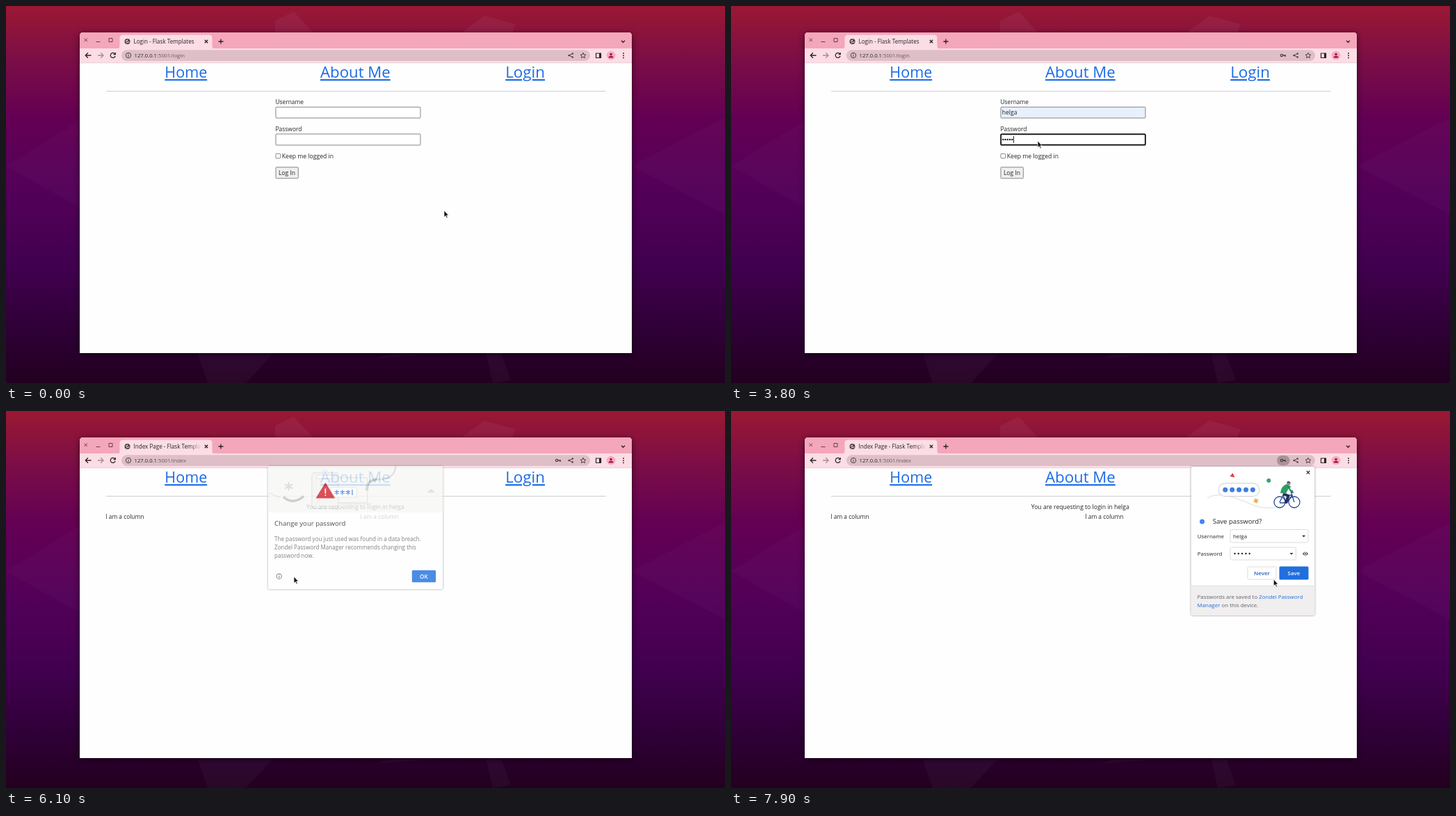
Write an HTML page that moves like this. It is 1034 by 542 pixels and loops after 8000 ms.

```html
<!DOCTYPE html>
<html lang="en">
<head>
<meta charset="utf-8">
<title>Login flow</title>
<style>
html, body { margin: 0; width: 100%; height: 100%; overflow: hidden; background: #4b0050; }
svg { display: block; width: 1034px; height: 542px; font-family: "Open Sans", "Noto Sans", sans-serif; }
text { white-space: pre; fill: #212529; }
.nav text { fill: #1a6be6; font-weight: 500; text-decoration: underline; text-decoration-thickness: 1.7px; text-underline-offset: 2.2px; }
.line { fill: none; stroke: #2b2226; stroke-width: 1.3; }
.field { fill: #fff; stroke: #85858a; stroke-width: 1; }
.focus { fill: none; stroke: #101010; stroke-width: 1.7; }
.card { filter: drop-shadow(0 .6px 1.3px #0008); }
.soft text { fill: #5f6368; }
.soft .link { fill: #1f6fd6; }
.bold { font-weight: 600; }
</style>
</head>
<body>
<svg viewBox="0 0 1034 542">
  <defs>
    <linearGradient id="sky" x2="0" y2="1">
      <stop offset="0" stop-color="#9a1833"/>
      <stop offset=".14" stop-color="#7c0e46"/>
      <stop offset=".3" stop-color="#630054"/>
      <stop offset=".48" stop-color="#540059"/>
      <stop offset=".68" stop-color="#420050"/>
      <stop offset=".87" stop-color="#2e0035"/>
      <stop offset="1" stop-color="#22001f"/>
    </linearGradient>
    <linearGradient id="fade">
      <stop offset="0" stop-color="#fcdde5" stop-opacity="0"/>
      <stop offset="1" stop-color="#fcdde5"/>
    </linearGradient>
    <g id="key">
      <circle r="1.7" cx="-2" fill="none" stroke="#4b4046" stroke-width="1.2"/>
      <path d="M0 0H4M3 0V2" fill="none" stroke="#4b4046" stroke-width="1.4"/>
    </g>
    <path id="drop" d="M-2.5-1.2H2.5L0 1.4Z" fill="#333"/>
  </defs>

  <rect width="1034" height="542" fill="url(#sky)"/>
  <g fill="#fff" fill-opacity=".045">
    <path d="M387 21L414 8 441 38H387ZM414 8V38H387ZM655 38L688 14 733 26 728 38Z"/>
    <path d="M275 499H385L345 542H290ZM530 507L560 499H640ZM690 499H712L726 538 700 542Z" fill-opacity=".03"/>
    <path d="M0 230L106 165V290ZM900 230L1034 160V300Z" fill-opacity=".018"/>
  </g>

  <!-- browser window -->
  <path d="M106 499V43Q106 38 111 38H895Q900 38 900 43V499Z" fill="#fefefe" style="filter:drop-shadow(0 2px 4px #0009)"/>
  <path d="M106 62V43Q106 38 111 38H895Q900 38 900 43V62Z" fill="#f4a6bb"/>
  <path d="M159 62Q163.500 62 163.500 57V46Q163.500 41.500 168 41.500H292Q296.500 41.500 296.500 46V57Q296.500 62 301 62Z" fill="#fcdde5"/>
  <rect x="106" y="61" width="794" height="21" fill="#fcdde5"/>
  <rect x="106" y="81.500" width="794" height=".7" fill="#dfc9cf"/>
  <rect x="166" y="63.300" width="674" height="15.700" rx="7.850" fill="#dfbfc7"/>
  <g class="line">
    <path d="M112.500 46.500L117 51M117 46.500L112.500 51M129.500 51.500H135.500M148 46.500H153V51.500H148Z" stroke="#6b3f4d" stroke-width="1"/>
    <path d="M285.800 48.800L290.200 53.200M290.200 48.800L285.800 53.200M305.500 51H312.500M309 47.500V54.500M885 49.800L887.500 52.300 890 49.800"/>
    <path d="M122.500 71H114.500M118 67.300L114.300 71 118 74.700"/>
    <path d="M132 71H140M136.300 67.300L140 71 136.300 74.700" stroke="#a58b93"/>
    <g stroke="#4b4046" stroke-width="1">
      <circle cx="176" cy="71" r="3.700"/>
      <path d="M176 70.300V73.200M176 68.600V69.500M814.800 68.500L809.600 71 814.800 73.500"/>
      <path d="M830 67.200L831.100 69.800 833.900 70.100 831.800 71.900 832.400 74.700 830 73.200 827.600 74.700 828.200 71.900 826.100 70.100 828.900 69.800Z"/>
    </g>
    <path d="M848.500 68H855.500V74.500H848.500ZM854 68V74.500" stroke-width="1.200"/>
    <path d="M853 68H855.500V74.500H853Z" fill="#2b2226" stroke="none"/>
  </g>
  <g fill="#4b4046"><circle cx="814.800" cy="68.500" r="1.200"/><circle cx="809.600" cy="71" r="1.200"/><circle cx="814.800" cy="73.500" r="1.200"/></g>
  <g fill="#2b2226"><circle cx="888" cy="68" r=".95"/><circle cx="888" cy="71.200" r=".95"/><circle cx="888" cy="74.400" r=".95"/></g>
  <circle cx="870" cy="71" r="6.300" fill="#f5aec1"/>
  <path d="M866.500 74.500Q866.500 71.800 870 71.800T873.500 74.500ZM868.200 69.500A1.800 1.800 0 1 1 871.800 69.500 1.800 1.800 0 1 1 868.200 69.500Z" fill="#a3123f"/>
  <g id="globe"><circle cx="174.500" cy="51" r="4" fill="#4b4046"/><path d="M171.800 50Q174 51 175 48.500M173 53.500Q174 51.500 177.500 52" fill="none" stroke="#fcdde5" stroke-width="1.200"/></g>
  <path id="spinner" d="M174.500 47.300A3.700 3.700 0 1 1 170.800 51" class="line" style="stroke:#6b5a60"/>
  <path id="reload" class="line" d="M156.600 68.900A3.500 3.500 0 1 0 157.100 72M157.300 67V69.700H154.600"/>
  <path id="stop" class="line" d="M150.800 68L156.800 74M156.800 68L150.800 74"/>
  <text id="title" x="183.500" y="53.900" font-size="8.100"></text>
  <g id="titleFade"><rect x="264" y="45" width="17" height="13" fill="url(#fade)"/><rect x="280.500" y="45" width="4" height="13" fill="#fcdde5"/></g>
  <text x="184.500" y="73.900" font-size="7.700">127.0.0.1<tspan id="path" fill="#6b5a60"></tspan></text>
  <g id="keyIcon"><rect id="keyPill" x="785" y="64" width="18.500" height="14.300" rx="7.150" fill="#aa9198"/><use href="#key" x="794" y="71"/></g>

  <!-- page -->
  <g class="nav">
    <text x="228.300" y="103.200" font-size="21.500">Home</text>
    <text x="452" y="103.200" font-size="22.200">About Me</text>
    <text x="718.200" y="103.200" font-size="22.400">Login</text>
  </g>
  <rect x="144" y="122" width="718.500" height="1" fill="#cfcfd1"/>
  <g id="login">
    <text x="387.500" y="141.400" font-size="8.400">Username</text>
    <text x="387.500" y="180.100" font-size="8.450">Password</text>
    <rect class="field" x="388" y="145.300" width="208" height="15.700" rx="1" id="nameBox"/>
    <rect class="field" x="388" y="184" width="208" height="16" rx="1"/>
    <rect id="nameFocus" class="focus" x="388.200" y="145.700" width="207.600" height="15" rx="1"/>
    <rect id="passFocus" class="focus" x="388.200" y="184.300" width="207.600" height="15.400" rx="1"/>
    <text id="name" x="389.700" y="156.200" font-size="8.600">helga</text>
    <path id="squiggle" d="M390 158.200q1-1.300 2 0t2 0 2 0 2 0 2 0 2 0 2 0 2 0 2 0 2 0 2 0" fill="none" stroke="#e0605e" stroke-width=".7"/>
    <g id="dots" fill="#212529"></g>
    <rect id="caret" width=".9" height="10" fill="#111"/>
    <rect x="388" y="212.300" width="6.600" height="6.600" rx="1" fill="#fff" stroke="#767676" stroke-width=".9"/>
    <text x="396.800" y="219" font-size="8.650">Keep me logged in</text>
    <rect x="388" y="231.800" width="32.300" height="16" rx="1" fill="#efefef" stroke="#858585"/>
    <rect id="buttonFocus" class="focus" x="388" y="231.800" width="32.300" height="16" rx="1"/>
    <text x="391.900" y="243.100" font-size="8.550">Log In</text>
    <g id="popup">
      <rect class="card" x="388.500" y="162" width="208" height="29" rx="1" fill="#fff"/>
      <rect id="row" x="388.500" y="165" width="208" height="23" fill="#e6e6e7"/>
      <text x="394" y="179.500" font-size="8.400">helga</text>
    </g>
  </g>
  <g id="index">
    <text x="431.800" y="141.400" font-size="8.600">You are requesting to login in helga</text>
    <text x="143.300" y="154.600" font-size="8.350">I am a column</text>
    <text x="509.300" y="154.600" font-size="8.350">I am a column</text>
  </g>

  <!-- breach warning -->
  <g id="warning">
    <rect class="card" x="378" y="80" width="249" height="175.500" rx="2" fill="#fff"/>
    <rect x="378" y="80" width="249" height="66" fill="#f7f8f5"/>
    <g fill="none" stroke="#dcdddd">
      <path d="M378 118Q386 121 396 125" stroke-width="1"/>
      <path d="M400 124Q413 136 429 123" stroke="#c3c4c4" stroke-width="3.500"/>
      <path d="M519 115Q518 100 534 99" stroke="#c3c4c4" stroke-width="3.500"/>
      <path d="M534 99Q558 100 560 80" stroke-width="2.500"/>
      <path d="M478 96.500H517Q519.500 96.500 519.500 99V132H478M470 134H526"/>
      <rect x="440.500" y="89.500" width="38" height="51" rx="4" fill="#f3f4f2"/>
      <path d="M447 98V93H472V98ZM456 93V89A3.500 3.500 0 0 1 463 89V93" fill="#fafafa"/>
      <path d="M407.500 103V115M402 106L413 112M413 106L402 112" stroke="#d5d6d6" stroke-width="2"/>
    </g>
    <path d="M605 118Q605 115 608 115 610 110 613 115 615 115 615 118Z" fill="#dcdddd"/>
    <rect x="468" y="110.500" width="36.500" height="14" fill="#fff" stroke="#d5dbe4" stroke-width=".8"/>
    <path d="M476 114V121M473 115.800L479 119.200M479 115.800L473 119.200M484 114V121M481 115.800L487 119.200M487 115.800L481 119.200M492 114V121M489 115.800L495 119.200M495 115.800L489 119.200M498 113.500V121.500" fill="none" stroke="#286fd6" stroke-width="1.200"/>
    <path d="M459.800 104.500L472.700 125.500H446.900Z" fill="#d2252f" stroke="#d2252f" stroke-linejoin="round"/>
    <path d="M459.800 112V119.200M459.800 121V122.700" stroke="#fff" stroke-width="1.700"/>
    <text x="387.200" y="165.200" font-size="9.500">Change your password</text>
    <g class="soft" font-size="8">
      <text x="387.200" y="186.500">The password you just used was found in a data breach.</text>
      <text x="387.200" y="198.700">Zondel Password Manager recommends changing this</text>
      <text x="387.200" y="210.900">password now.</text>
    </g>
    <g fill="none" stroke="#5f6368"><circle cx="393.800" cy="237" r="3.600"/><path d="M393.800 236.300V239.200M393.800 234.600V235.500"/></g>
    <rect id="ring" x="581.700" y="227.300" width="36.600" height="19.400" rx="2.500" fill="#fff" stroke="#1a5fc8" stroke-width="1.300"/>
    <rect x="583" y="228.500" width="34" height="17" rx="1.500" fill="#1f70e0"/>
    <text class="bold" x="600" y="240" font-size="8.200" text-anchor="middle" style="fill:#fff">OK</text>
  </g>

  <!-- save bubble -->
  <g id="save">
    <rect class="card" x="661.500" y="80" width="178" height="214" rx="2" fill="#fff"/>
    <path d="M661.500 251.500H839.500V292Q839.500 294 837.500 294H663.500Q661.500 294 661.500 292Z" fill="#f0eeef"/>
    <rect x="661.500" y="251" width="178" height=".8" fill="#dcdadb"/>
    <path d="M827.700 86L832.300 90.600M832.300 86L827.700 90.600" class="line" style="stroke-width:1.1"/>
    <path d="M685 125Q700 117 719 123T752 136Q764 140 782 139" fill="none" stroke="#dadce0"/>
    <rect x="701" y="103.800" width="59" height="18.800" rx="9.400" fill="#fff" stroke="#d3d6db" stroke-width="1.200"/>
    <g id="bigDots" fill="#3f7de0"></g>
    <path d="M721.500 89L724.500 95.500 717.500 94Z" fill="#d9443c"/>
    <circle cx="773.300" cy="100" r="3" fill="#34a56a"/>
    <rect x="752.300" y="126.300" width="5.600" height="5.600" rx=".8" fill="#efb45c" transform="rotate(20 755 129)"/>
    <g fill="none" stroke="#27498f" stroke-width="1.300">
      <circle cx="789" cy="131" r="8"/><circle cx="810" cy="131" r="8"/>
      <path d="M789 131L794 121H807L799 132H789M794 121L799 132M810 131L805.500 117H809"/>
    </g>
    <path d="M794 119L801.500 122 798 132.500" fill="none" stroke="#243057" stroke-width="4" stroke-linejoin="round"/>
    <path d="M790 118Q791 108 799 105L806 109 802 111 798 119Z" fill="#2f9e63"/>
    <path d="M801 108L805 115H808" fill="none" stroke="#27864f" stroke-width="2"/>
    <circle cx="802" cy="104" r="2.700" fill="#8d8588"/>
    <path d="M799 103Q801 99.500 805 103Z" fill="#333b50"/>
    <circle cx="677.500" cy="159" r="3.500" fill="#4285f4"/>
    <text x="692.700" y="162.400" font-size="9.600">Save password?</text>
    <g font-size="7.950">
      <text x="670.700" y="182.700">Username</text>
      <text x="670.700" y="208">Password</text>
      <g fill="#fff" stroke="#dcdcde"><rect x="718" y="170.500" width="112" height="18.500" rx="1.500"/><rect x="718" y="196" width="94.500" height="18" rx="1.500"/><rect x="743" y="224" width="41" height="18" rx="1.500"/></g>
      <text x="722" y="182.700">helga</text>
      <use href="#drop" x="823.700" y="180"/><use href="#drop" x="806" y="205.300"/>
      <g id="smallDots" fill="#222"></g>
      <path d="M821.800 205.200Q826 199.700 830.200 205.200 826 210.700 821.800 205.200Z" fill="#555"/><circle cx="826" cy="205.200" r="1.600" fill="#555" stroke="#fff" stroke-width=".9"/>
      <rect x="788.500" y="223.500" width="42" height="19" rx="1.500" fill="#1f6fde"/>
      <g class="bold" text-anchor="middle"><text x="763.500" y="236" style="fill:#1f5fc4">Never</text><text x="809.500" y="236" style="fill:#fff">Save</text></g>
      <g class="soft">
        <text x="670.500" y="269.700">Passwords are saved to <tspan class="link">Zondel Password</tspan></text>
        <text x="670.500" y="281.700"><tspan class="link">Manager</tspan> on this device.</text>
      </g>
    </g>
  </g>

  <path id="arrow" d="M0 0V9.500L2.200 7.600 3.700 10.900 5.200 10.200 3.700 7H6.500Z" fill="#111" stroke="#fff" stroke-width=".7"/>
  <path id="beam" d="M-2-4H2M0-4V4M-2 4H2" fill="none" stroke="#333" stroke-width=".9"/>
</svg>
<script>
const $ = id => document.getElementById(id);
const show = (id, on) => $(id).style.display = on ? '' : 'none';
const within = (t, from, to) => t >= from && t < to;
// latest entry of a [time, ...values] track
const latest = (track, t) => track.findLast(step => step[0] <= t);

const dotRow = (id, x, gap, y, r) => {
  for (let i = 0; i < 5; i++)
    $(id).innerHTML += `<circle cx="${x + i * gap}" cy="${y}" r="${r}"/>`;
};
dotRow('dots', 391.3, 3.25, 192, 1.25);
dotRow('bigDots', 710.8, 9.9, 113.2, 3.5);
dotRow('smallDots', 724.5, 5.3, 205, 1.2);

const pointer = [
  [0, 630, 294], [100, 614, 279], [200, 572, 237], [300, 514, 192], [400, 470, 165],
  [500, 455, 154], [1100, 454, 160], [1200, 452, 171], [1300, 450, 180], [1400, 449.5, 184.3],
  [2000, 446, 192], [3800, 441, 194], [3900, 438, 201], [4000, 433, 208], [4100, 429, 214],
  [4300, 417, 232], [4400, 414, 236], [4800, 414, 238],
  [6600, 428, 238], [6700, 482, 234], [6800, 546, 231.5], [6900, 576.3, 232],
  [7000, 588, 233], [7100, 595, 234.5], [7700, 741, 242], [7900, 780.3, 242]
];
const typed = [[0, 0], [2600, 1], [2800, 2], [3300, 4], [3500, 5]];
// time, opacity, scale, vertical shift
const warning = [
  [0, 0, 1, 0], [6100, .8, 1.01, 0], [6300, .95, 1.004, 0], [6400, 1, 1, 0],
  [7300, .88, 1.014, -3], [7400, .25, 1.03, -5], [7500, 0, 1, 0]
];
const bubble = [[0, 0, 1, 0], [7300, .25, .96, 0], [7400, .8, .99, 0], [7500, 1, 1, 0]];

function pose(id, track, t, cx, cy) {
  const [, alpha, scale, dy] = latest(track, t);
  show(id, alpha > 0);
  $(id).setAttribute('opacity', alpha);
  $(id).setAttribute('transform', `translate(${cx} ${cy + dy}) scale(${scale}) translate(${-cx} ${-cy})`);
}

function draw(t) {
  const done = t >= 5500, loading = within(t, 4600, 5500);
  const nameOn = within(t, 500, 2100), passOn = within(t, 2100, 4400);
  const filled = t >= 1200;
  show('login', !done);
  show('index', done);
  $('title').textContent = done ? 'Index Page - Flask Templa' : 'Login - Flask Templates';
  $('path').textContent = done ? ':5001/index' : ':5001/login';
  show('titleFade', done);
  show('globe', !loading);
  show('spinner', loading);
  show('reload', !loading);
  show('stop', loading);
  $('spinner').setAttribute('transform', `rotate(${t * .45} 174.5 51)`);
  show('keyIcon', t >= 2600);
  show('keyPill', t >= 7400);

  show('nameFocus', nameOn);
  show('passFocus', passOn);
  show('buttonFocus', t >= 4400);
  show('name', filled);
  show('squiggle', within(t, 1700, 2100));
  $('nameBox').style.fill = filled ? (nameOn ? '#e6f2fa' : '#e8f0fb') : '#fff';
  show('popup', within(t, 800, 1800));
  $('popup').setAttribute('opacity', within(t, 900, 1600) ? 1 : .5);
  show('row', t >= 1200);

  const count = latest(typed, t)[1];
  [...$('dots').children].forEach((dot, i) => dot.style.display = i < count ? '' : 'none');
  show('caret', nameOn || passOn);
  $('caret').setAttribute('x', passOn ? 389.8 + count * 3.25 : t >= 1600 ? 411.8 : 389.8);
  $('caret').setAttribute('y', passOn ? 187 : 148.3);

  pose('warning', warning, t, 502.5, 167.8);
  pose('save', bubble, t, 750.5, 187);
  show('ring', within(t, 6400, 7200));

  const [, x, y] = latest(pointer, t);
  const beam = within(t, 500, 3800);
  show('beam', beam);
  show('arrow', !beam);
  $(beam ? 'beam' : 'arrow').setAttribute('transform', `translate(${x} ${y})`);
}

const start = performance.now();
function tick() {
  draw(Math.floor((performance.now() - start) % 8000 / 100) * 100);
  requestAnimationFrame(tick);
}
tick();
</script>
</body>
</html>
```
